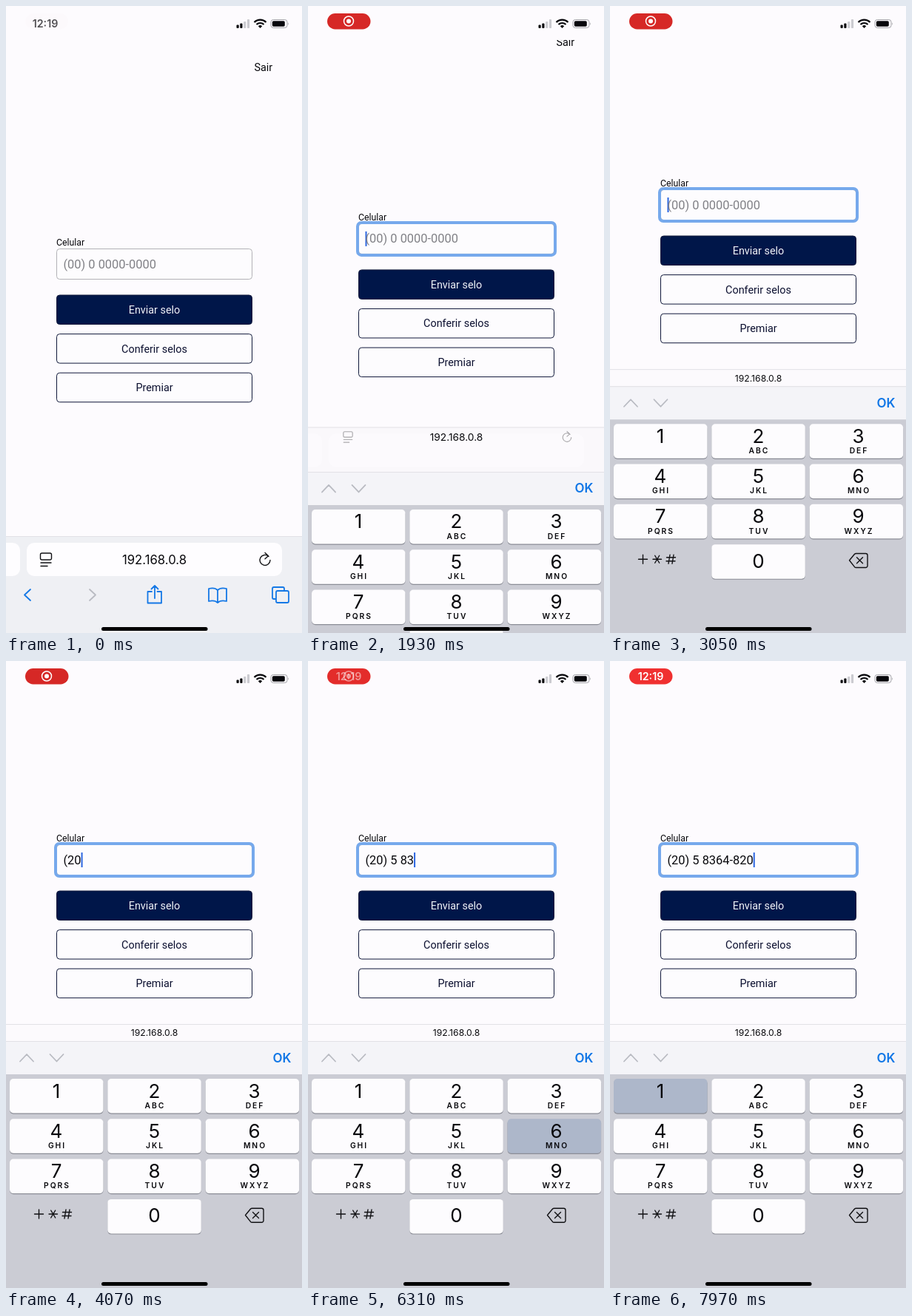
An HTML page that plays this animation: 400x848 px, repeating every 8 s.

```html
<!DOCTYPE html>
<html lang="pt-BR">
<head>
<meta charset="utf-8">
<title>Selos</title>
<style>
  html, body { margin: 0; width: 100%; height: 100%; overflow: hidden; background: #fdfbfe; }
  svg { display: block; width: 100%; height: 100%; }
  text { font-family: Roboto, sans-serif; fill: #08080c; white-space: pre; }
  .ui text { font-family: Inter, sans-serif; }
  .mid { text-anchor: middle; }
  .line { fill: none; stroke: #111114; stroke-width: 1.4; stroke-linecap: round; stroke-linejoin: round; }
  .blue { stroke: #1478e6; stroke-width: 1.8; }
  .pale { stroke: #b9bbc2; stroke-width: 1.8; }
</style>
</head>
<body>
<svg viewBox="0 0 400 848">
  <defs><clipPath id="below"><rect y="46" width="400" height="802"/></clipPath></defs>
  <rect width="400" height="848" fill="#fdfbfe"/>

  <g clip-path="url(#below)">
    <g id="page">
      <text x="335.5" y="88" font-size="14.36">Sair</text>
      <text x="68" y="324" font-size="12.3">Celular</text>
      <rect x="68.5" y="328.5" width="264" height="41" rx="4" fill="#fdfcfe" stroke="#b2b2b6"/>
      <g id="focus">
        <rect x="67" y="327" width="267" height="44" rx="5" fill="none" stroke="#76a9ec" stroke-width="4"/>
        <rect id="caret" x="77.5" y="339" width="2" height="20" fill="#2c66e0"/>
      </g>
      <text id="phone" x="77.5" y="354.5" font-size="16.41"></text>
      <g id="buttons"></g>
    </g>
  </g>

  <g class="ui">
    <g id="bar">
      <rect y="717" width="400" height="140" fill="#fcfafd"/>
      <g id="chrome">
        <rect y="717" width="400" height="140" fill="#eff0f4"/>
        <rect x="-20" y="726" width="39" height="45" rx="10" fill="#fefdff"/>
        <rect x="28" y="726" width="345" height="45" rx="10" fill="#fefdff"/>
        <path class="line blue" d="M33 789l-8 7.500l8 7.500"/>
        <path class="line pale" d="M113 789l8 7.500l-8 7.500"/>
        <path class="line blue" d="M197 792h-5.500v15.500h18.500v-15.500h-5.500M201 801v-17m-4.500 4.500l4.500-4.500l4.500 4.500
          M286 790c-3-3-8-3-12-2v17c4-1 9-1 12 2c3-3 8-3 12-2v-17c-4-1-9-1-12 2v17"/>
        <path class="line blue" d="M365 802h-3a2 2 0 0 1-2-2v-12a2 2 0 0 1 2-2h12a2 2 0 0 1 2 2v3M367 791h13a2 2 0 0 1 2 2v12a2 2 0 0 1-2 2h-13a2 2 0 0 1-2-2v-12a2 2 0 0 1 2-2z"/>
      </g>
      <path d="M0 717.500H400" stroke="#e2e1e6"/>
    </g>
    <path id="pageIcon" class="line" d="M-5.500-9h11a2 2 0 0 1 2 2v5a2 2 0 0 1-2 2h-11a2 2 0 0 1-2-2v-5a2 2 0 0 1 2-2zM-7 4h14M-7 8.500h9"/>
    <path id="reloadIcon" class="line" d="M5-4.500a7 7 0 1 0 2 5M0-9.500l4.500 4.300l-4.500 4"/>
    <text id="url" class="mid" x="200.5">192.168.0.8</text>

    <g id="keyboard">
      <rect y="514" width="400" height="340" fill="#cbccd4"/>
      <rect y="514" width="400" height="45" fill="#f4f4f8"/>
      <path d="M0 514.500H400" stroke="#e2e1e6"/>
      <path class="line pale" d="M19 541.500l9-9.500l9 9.500M59.500 532l9 9.500l9-9.500"/>
      <text x="360.5" y="542.5" font-size="17" font-weight="600" style="fill:#0f76e6">OK</text>
      <g id="keys"></g>
      <path class="line" d="M38.500 748h12M44.500 742v12M58 748h11.500M60.700 743l6 10M66.700 743l-6 10M76.500 745.500h12M76 750.500h12M81 742l-2 12M86 742l-2 12"/>
      <path class="line" d="M323.500 749.500l7-8.500q.8-.8 2-.8h13a2.500 2.500 0 0 1 2.500 2.500v14a2.500 2.500 0 0 1-2.500 2.500h-13q-1.200 0-2-.8zM333.500 745.500l8 8M341.500 745.500l-8 8"/>
    </g>

    <text id="clock" class="mid" x="53" y="29" font-size="14.3" font-weight="600">12:19</text>
    <g id="pill">
      <rect x="26" y="10" width="58.5" height="21.5" rx="10.7"/>
      <g id="record">
        <circle cx="55" cy="20.5" r="6.5" fill="none" stroke="#fff" stroke-width="1.5"/>
        <circle cx="55" cy="20.5" r="3" fill="#fff"/>
      </g>
      <text id="pillClock" class="mid" x="55" y="25.5" font-size="14.3" font-weight="600" style="fill:#fff">12:19</text>
    </g>

    <g fill="#08080c">
      <rect x="311.5" y="25.5" width="3.2" height="4.5" rx="1"/>
      <rect x="316.3" y="23.5" width="3.2" height="6.5" rx="1"/>
      <rect x="321.1" y="21" width="3.2" height="9" rx="1" fill="#cbcbd0"/>
      <rect x="325.9" y="18" width="3.2" height="12" rx="1" fill="#cbcbd0"/>
      <path d="M343.500 30l-2.700-2.800a3.900 3.900 0 0 1 5.400 0z"/>
      <path fill="none" stroke="#08080c" stroke-width="2.2" d="M338.500 25a7.200 7.200 0 0 1 10 0M335.500 22a11.400 11.400 0 0 1 16 0"/>
      <rect x="358" y="18.5" width="22" height="11" rx="3.3" fill="none" stroke="#a4a4a9"/>
      <rect x="359.8" y="20.3" width="17" height="7.4" rx="1.8"/>
      <path d="M381.300 22.300q1.800 1.700 0 3.600z" fill="#a4a4a9"/>
    </g>
    <rect x="129" y="840" width="143.5" height="5" rx="2.5" fill="#000"/>
  </g>
</svg>

<script>
const LOOP = 8000;
const $ = id => document.getElementById(id);
const clamp = x => Math.min(1, Math.max(0, x));
const ramp = (t, from, to) => clamp((t - from) / (to - from));
const shift = (id, dy) => $(id).setAttribute('transform', `translate(0 ${dy})`);
const fade = (id, opacity) => $(id).setAttribute('opacity', opacity);

// Form buttons
$('buttons').innerHTML = ['Enviar selo', 'Conferir selos', 'Premiar'].map((label, i) => {
  const y = 391 + i * 52.6;
  const [fill, ink] = i ? ['#fdfcfe', '#0c1030'] : ['#001649', '#f2f2f8'];
  return `<rect x="68.5" y="${y}" width="264" height="39.5" rx="4" fill="${fill}" stroke="#10183a"/>
    <text class="mid" x="200.5" y="${y + 25}" font-size="14.36" style="fill:${ink}">${label}</text>`;
}).join('');

// Numeric keypad
const letters = ['', 'ABC', 'DEF', 'GHI', 'JKL', 'MNO', 'PQRS', 'TUV', 'WXYZ'];
function key(digit, col, row) {
  const x = 5 + col * 132.3, y = 565 + row * 54.3;
  const center = [68, 200.5, 335.5][col];
  const baseline = digit ? y + 25.5 : y + 31.5;
  return `<rect x="${x}" y="${y + 1.2}" width="126.5" height="46.5" rx="5" fill="#8b8d96"/>
    <rect id="key${digit}" x="${x}" y="${y}" width="126.5" height="46.5" rx="5"/>
    <text class="mid" x="${center}" y="${baseline}" font-size="26">${digit}</text>
    <text class="mid" x="${center + 1}" y="${y + 39.8}" font-size="10.3" font-weight="600" letter-spacing="2">${letters[digit - 1] || ''}</text>`;
}
$('keys').innerHTML = letters.map((_, i) => key(i + 1, i % 3, i / 3 | 0)).join('') + key(0, 1, 3);

// Each digit lands when its key is released.
const digits = '20583648201';
const releases = [3500, 4030, 4560, 5100, 5680, 6400, 6750, 7090, 7430, 7780, 8050];
const PRESS = 130;

function mask(d) {
  let out = '(' + d.slice(0, 2);
  if (d.length > 2) out += ') ' + d[2];
  if (d.length > 3) out += ' ' + d.slice(3, 7);
  if (d.length > 7) out += '-' + d.slice(7);
  return out;
}

// Critically damped spring: remaining distance, from 1 to 0.
function springLeft(t, start, rate) {
  const x = Math.max(0, t - start) * rate;
  return (1 + x) * Math.exp(-x);
}

function draw(t) {
  const left = springLeft(t, 1590, 0.00654);
  const scroll = (1 - Math.cos(Math.PI * ramp(t, 1632, 2292))) / 2;
  shift('page', -80 * scroll);
  shift('keyboard', 334 * left);
  shift('bar', -226 * (1 - left));
  fade('chrome', left ** 2);

  const urlY = 503 + 246 * left ** 1.06;
  const size = 12.2 + 4.5 * left;
  $('url').setAttribute('font-size', size);
  $('url').setAttribute('y', urlY + size * 0.36);
  for (const [id, x] of [['pageIcon', 54], ['reloadIcon', 350]]) {
    $(id).setAttribute('transform', `translate(${x} ${urlY}) scale(${size / 16.7})`);
    fade(id, left);
  }

  const typed = digits.slice(0, releases.filter(at => at <= t).length);
  const phone = $('phone');
  phone.textContent = typed ? mask(typed) : '(00) 0 0000-0000';
  phone.style.fill = typed ? '#08080c' : '#818186';
  $('caret').setAttribute('x', 77.5 + (typed ? phone.getComputedTextLength() : 0));
  fade('focus', t >= 1600 ? 1 : 0);

  const pressed = releases.findIndex(at => t >= at - PRESS && t < at);
  for (let d = 0; d < 10; d++) {
    $('key' + d).setAttribute('fill', d === +digits[pressed] ? '#adb7ca' : '#fdfcfe');
  }

  const recording = ramp(t, 0, 350);
  const swap = ramp(t, 6160, 6460);
  fade('clock', 0.7 * (1 - recording));
  fade('pill', recording);
  fade('record', 1 - swap);
  fade('pillClock', swap);
  $('pill').setAttribute('fill', `rgb(${214 + 26 * swap} ${40 + 8 * swap} ${38 + 10 * swap})`);
}

const origin = performance.now();
function tick() {
  draw((performance.now() - origin) % LOOP);
  requestAnimationFrame(tick);
}
tick();
</script>
</body>
</html>
```
